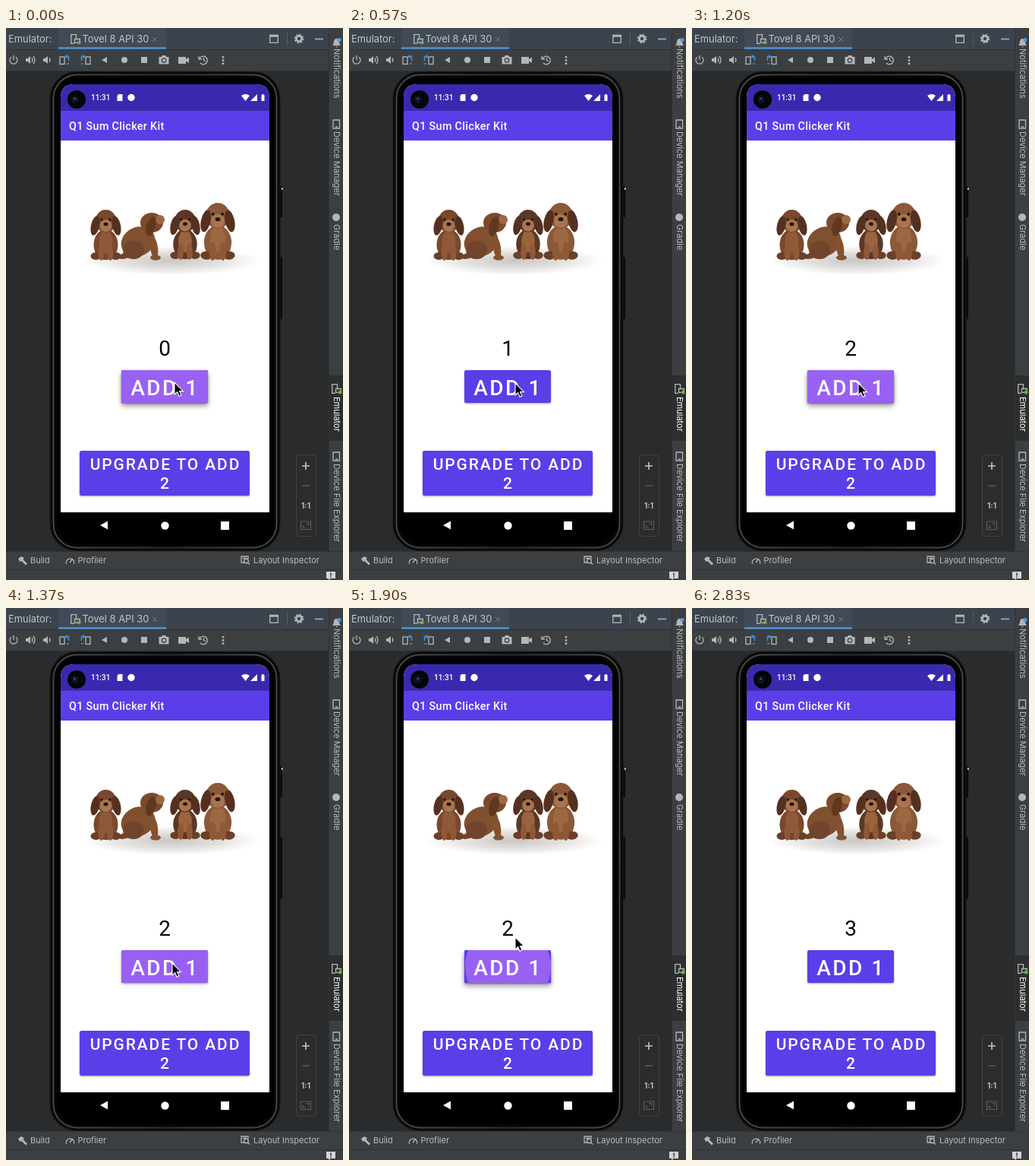
Recreate the animation shown at these times as an HTML page. Size 444 px wide and 726 px high, loop 2.91 s.

```html
<!DOCTYPE html>
<html lang="en">
<head>
<meta charset="utf-8">
<title>Counter in an emulator</title>
<style>
  html, body { margin: 0; width: 100%; height: 100%; overflow: hidden; background: #292b2d; }
  svg { display: block; width: 444px; height: 726px; }
  text { font-family: Inter, "Liberation Sans", sans-serif; white-space: pre; }
  .ide text { font-size: 11px; fill: #b9bcbe; }
  .ide .head { font-size: 12.9px; fill: #bfc4c9; }
  .app text { font-family: Roboto, "Noto Sans", sans-serif; font-weight: 500; fill: #fff; }
  .line { fill: none; stroke: #b4b7b9; stroke-width: 1.3; }
  .solid { fill: #b4b7b9; }
  .app .caps { text-anchor: middle; letter-spacing: .0893em; }
  .button { fill: #5c3ee9; filter: drop-shadow(0 1px 1.2px rgba(0, 0, 0, .38)); }
  #raised { fill: #000; filter: drop-shadow(0 4px 3.5px rgba(0, 0, 0, .4)); }
</style>
</head>
<body>
<svg viewBox="0 0 444 726">
  <defs>
    <clipPath id="screen"><path d="M72 672V92Q72 74 90 74H329Q347 74 347 92V672Z"/></clipPath>
    <clipPath id="addClip"><rect x="152" y="450" width="114" height="43" rx="2.5"/></clipPath>
    <radialGradient id="floor">
      <stop offset="0" stop-color="#c9c6c4"/>
      <stop offset=".55" stop-color="#e3e1df"/>
      <stop offset="1" stop-color="#fff"/>
    </radialGradient>
    <linearGradient id="rim" x2="1">
      <stop offset="0" stop-color="#4b4b4b"/>
      <stop offset=".5" stop-color="#2c2c2c"/>
      <stop offset="1" stop-color="#4b4b4b"/>
    </linearGradient>
    <g id="phoneIcon">
      <path class="line" d="M7.5 6V.7H.7V12.3H5"/>
      <path class="line" d="M5.5 6.5H12.3V11.3H5.5Z"/>
      <circle cx="11.2" cy="11.2" r="2.4" fill="#62b543"/>
    </g>
    <g id="speaker">
      <path class="solid" d="M-6 -2H-3.5L0 -5V5L-3.5 2H-6Z"/>
      <path class="line" d="M2 -2.6Q4 0 2 2.6"/>
    </g>
    <g id="turn">
      <rect class="line" x="-6" y="-4" width="6" height="9.5"/>
      <path d="M2 -4.5H5.5V1M3 5H6M3.5 -6.5L1.5 -4.5L3.5 -2.5" fill="none" stroke="#3d93d6" stroke-width="1.5"/>
    </g>
  </defs>

  <rect width="444" height="726" fill="#292b2d"/>

  <g class="ide">
    <rect width="426" height="56" fill="#3c3f41"/>
    <rect width="426" height="28" fill="#3b434d"/>
    <rect x="69" width="142" height="28" fill="#414a56"/>
    <rect x="69" y="25" width="142" height="3" fill="#4a88c7"/>
    <path d="M0 28.5H426M0 56.5H426" stroke="#303234"/>
    <text class="head" x="3" y="19">Emulator:</text>
    <use href="#phoneIcon" x="85" y="8"/>
    <text class="head" x="100.5" y="19">Tovel 8 API 30</text>
    <path d="M193 12L199 18M199 12L193 18" stroke="#777e85"/>
    <path class="line" d="M347.7 9.5H358.3V19.3H347.7ZM347.7 11H358.3M407 14.5H418"/>
    <path d="M370.5 5V23" stroke="#565b60"/>
    <circle cx="386" cy="14" r="3.6" fill="none" stroke="#b4b7b9" stroke-width="2.6"/>
    <circle cx="386" cy="14" r="5.4" fill="none" stroke="#b4b7b9" stroke-width="1.8" stroke-dasharray="2.2 2.04"/>

    <path class="line" d="M7 38.2A5 5 0 1 0 13 38.2M10 36V42"/>
    <use href="#speaker" x="32" y="42"/>
    <path class="line" d="M36 37Q40 42 36 47"/>
    <use href="#speaker" x="55" y="42"/>
    <use href="#turn" x="77" y="42"/>
    <use href="#turn" transform="translate(105 42) scale(-1 1)"/>
    <path class="solid" d="M126 42L133 38V46ZM178 38H186V46H178Z"/>
    <circle class="solid" cx="156" cy="42" r="4"/>
    <path class="solid" d="M201.500 38H204.500L206 36H210L211.500 38H214.500V47.500H201.500Z"/>
    <circle cx="208" cy="42.500" r="2.700" fill="#b4b7b9" stroke="#3c3f41" stroke-width="1.300"/>
    <path class="solid" d="M227 38H237V41L241 38.500V46L237 43.500V47H227Z"/>
    <path class="line" d="M255.300 40A5.300 5.300 0 1 1 256 46M254 37V41H258M260.500 39V42.500L263 44"/>
    <path d="M286 37V48" stroke="#b4b7b9" stroke-width="2.600" stroke-dasharray="2.600 1.600"/>

    <rect x="426" width="18" height="712" fill="#3c3f41"/>
    <rect x="426" y="457" width="18" height="86" fill="#2c2e2f"/>
    <path d="M425.500 0V688" stroke="#303234"/>
    <path class="solid" d="M430 23Q432 21 432 17.500Q432.500 14 435.500 14Q439 14 439 17.500Q439 21 441 23ZM434 24H437L435.500 25.500Z"/>
    <circle cx="439" cy="15.500" r="2.600" fill="#4a9bd8"/>
    <path class="line" d="M431 121H439.500V132H431ZM434 130H437"/>
    <circle class="solid" cx="435" cy="249" r="5"/>
    <use href="#phoneIcon" x="429" y="468"/>
    <path class="line" d="M431 558H439.500V569H431ZM434 567H437"/>
    <g id="side"></g>

    <rect y="688" width="444" height="38" fill="#3c3f41"/>
    <path d="M0 688.500H444M0 712.500H444" stroke="#303234"/>
    <path class="solid" d="M16 698L20 695L24 697L22.500 699L28 704.500L26 706.500L20.500 701L18.500 702Z"/>
    <text x="32" y="704">Build</text>
    <path class="line" d="M79.500 705A5.300 5.300 0 1 1 89.500 705M84 703L88 698"/>
    <text x="94.500" y="704">Profiler</text>
    <path class="line" d="M315 703H310V695H319V698M312 697.500H317"/>
    <circle class="line" cx="316.500" cy="701" r="2.800"/>
    <path class="line" d="M318.500 703L321 705.500"/>
    <text x="326" y="704">Layout Inspector</text>
    <path d="M422 715H434V724H428L425 726V724H422Z" fill="#d3d5d6"/>
    <path d="M428 716.500V720.500M428 721.500V723" stroke="#3c3f41" stroke-width="1.600"/>

    <rect x="382.500" y="561.500" width="26" height="107" rx="4" fill="#2a2c2e" stroke="#404244"/>
    <path d="M390 576H400M395 571V581" stroke="#c4c6c8" stroke-width="1.600"/>
    <path d="M390 602H400" stroke="#5b5e60" stroke-width="1.400"/>
    <text x="395" y="632" text-anchor="middle" style="font-size:10px;font-weight:700">1:1</text>
    <path d="M388.500 649H401.500V659.500H388.500ZM391.500 654V657H394.500M398.500 654.500V651.500H395.500" fill="none" stroke="#5b5e60" stroke-width="1.200"/>
  </g>

  <rect x="360" y="208" width="4" height="41" rx="1" fill="#0b0b0b"/>
  <rect x="360" y="301" width="4" height="82" rx="1" fill="#0b0b0b"/>
  <rect x="363" y="210" width="1.500" height="3" fill="#ddd"/>
  <rect x="58" y="57.500" width="303" height="630" rx="35" fill="#090909" stroke="#191919"/>
  <rect x="62.500" y="61.500" width="294" height="622" rx="31" fill="#050505" stroke="url(#rim)" stroke-width="1.800"/>
  <rect x="67" y="66" width="285" height="613" rx="27" fill="#000"/>

  <g class="app" clip-path="url(#screen)">
    <rect x="72" y="74" width="275" height="563" fill="#fff"/>
    <rect x="72" y="109" width="275" height="39" fill="#5c3ee9"/>
    <rect x="72" y="74" width="275" height="35" fill="#3929af"/>
    <circle cx="93" cy="94" r="12" fill="#050507"/>
    <circle cx="91" cy="94" r="5" fill="#10131f"/>
    <circle cx="90.500" cy="93" r="1.300" fill="#495b8a"/>
    <text x="112" y="95" font-size="10">11:31</text>
    <path d="M148.500 87H153.500V96H146.500V89Z" fill="#fff"/>
    <circle cx="165" cy="91.500" r="4.700" fill="#fff"/>
    <path d="M310 89Q315.500 85 321 89L315.500 96ZM331 87V96H322ZM336.500 88H337.500V87H339.500V88H340.500V96H336.500Z" fill="#fff"/>
    <text x="83" y="134" font-size="14.300" letter-spacing=".35">Q1 Sum Clicker Kit</text>

    <ellipse cx="218" cy="306" rx="117" ry="19" fill="url(#floor)"/>
    <g id="dogs"></g>

    <text id="count" x="209" y="431" font-size="28" text-anchor="middle" style="fill:#000;font-weight:400">0</text>
    <rect id="raised" x="152" y="450" width="114" height="43" rx="2.500"/>
    <rect class="button" x="152" y="450" width="114" height="43" rx="2.500"/>
    <g clip-path="url(#addClip)"><circle id="ripple" fill="#9961f3"/></g>
    <text class="caps" x="209.500" y="483" font-size="28">ADD 1</text>
    <rect class="button" x="97" y="556" width="224" height="59" rx="2.500"/>
    <text class="caps" x="210" y="581" font-size="21">UPGRADE TO ADD</text>
    <text class="caps" x="210" y="606" font-size="21">2</text>

    <path d="M124 654L134 648.500V659.500ZM283 649H294V660H283Z" fill="#fff"/>
    <circle cx="209.500" cy="654.500" r="5.200" fill="#fff"/>
  </g>

  <g id="ring" fill="none">
    <circle cx="220" cy="471" r="20" stroke="#fff" stroke-width="6"/>
    <circle cx="220" cy="471" r="20.500" stroke="#000" stroke-width="3.300"/>
  </g>
  <path id="cursor" d="M0 0V16L3.700 12.600L6.100 18.200L8.900 17L6.500 11.600H11.500Z" fill="#000" stroke="#fff" stroke-width="1.100"/>
</svg>

<script>
const LOOP = 2910;
const $ = id => document.getElementById(id);

// Sidebar labels: text, top, colour
$('side').innerHTML = [
  ['Notifications', 27], ['Device Manager', 136], ['Gradle', 258],
  ['Emulator', 485, '#fff'], ['Device File Explorer', 573]
].map(([name, y, color = '#b9bcbe']) =>
  `<text transform="translate(431.5 ${y}) rotate(90)" style="fill:${color}">${name}</text>`).join('');

const oval = (x, y, rx, ry, fill, turn = 0) =>
  `<ellipse cx="${x}" cy="${y}" rx="${rx}" ry="${ry}" fill="${fill}" transform="rotate(${turn} ${x} ${y})"/>`;

function sittingDog(x, top, height, coat, chest) {
  const s = height / 68;
  const parts = [
    oval(0, 46, 16, 20, coat), oval(0, 42, 9, 15, chest),
    oval(-13, 61, 7, 5, '#6b3f28'), oval(13, 61, 7, 5, '#6b3f28'),
    oval(-6, 56, 4, 11, '#8f5937'), oval(6, 56, 4, 11, '#8f5937'),
    oval(0, 15, 14, 15, coat),
    oval(-14, 21, 5.5, 13, '#56301f', 12), oval(14, 21, 5.5, 13, '#56301f', -12),
    oval(0, 21, 8, 8, '#a9744e'),
    oval(-5.5, 13, 1.7, 1.7, '#1d1410'), oval(5.5, 13, 1.7, 1.7, '#1d1410'),
    oval(0, 19, 3, 2.3, '#1d1410')
  ];
  return `<g transform="translate(${x} ${top}) scale(${s})">${parts.join('')}</g>`;
}

$('dogs').innerHTML = [
  oval(158, 299, 10, 4, '#70452e', -18), oval(174, 281, 23, 19, '#80502f', -25),
  oval(168, 292, 14, 12, '#70442d'), oval(195, 289, 5, 15, '#83522f', -8),
  oval(197, 302, 7, 3.5, '#83522f'), oval(192, 256, 15, 13, '#7a492e'),
  oval(203, 252, 6, 6, '#a0683f'), oval(191, 261, 6, 13, '#60371f', 15),
  sittingDog(131.5, 239, 68, '#79482d', '#8f5a3a'),
  sittingDog(236, 239, 67, '#5b3826', '#9a643f'),
  sittingDog(279, 230, 77, '#8b5937', '#9c6842')
].join('');

// Piecewise linear value from [time, value] steps
function at(steps, t) {
  let i = steps.findIndex(s => s[0] > t);
  if (i < 0) return steps[steps.length - 1][1];
  if (i === 0) return steps[0][1];
  const [t0, a] = steps[i - 1], [t1, b] = steps[i];
  return a + (b - a) * (t - t0) / (t1 - t0);
}

// Ripple start of each press; the first began before the loop
const presses = [-270, 960, 1715];
const radius = [[0, 18], [185, 56.5], [230, 63]];
const fade = [[0, .75], [60, 1], [400, 1], [640, 0]];
const lift = [[0, 0], [80, 1], [310, 1], [430, 0]];
const additions = [50, 1165, 2000];
const rings = [[900, 1000], [1640, 1740]];
const cursorX = [[0, 222], [240, 222], [400, 219]];
const cursorY = [[0, 466], [400, 467], [1770, 467], [1900, 433], [2000, 330], [2170, -30]];

function draw(now) {
  const step = Math.floor((now % LOOP + 4) * .03);
  const t = step / .03;
  const since = t - presses.filter(p => p <= t).pop();
  const r = at(radius, since);
  const settle = Math.min(1, since / 185);

  $('count').textContent = additions.filter(a => a <= t).length;
  $('ripple').setAttribute('cx', 220 - 10.5 * settle);
  $('ripple').setAttribute('cy', 471.5);
  $('ripple').setAttribute('r', r);
  $('ripple').style.opacity = at(fade, since);
  $('raised').style.opacity = at(lift, since);
  $('ring').style.display = rings.some(([a, b]) => t >= a && t < b) ? '' : 'none';
  $('cursor').setAttribute('transform', `translate(${at(cursorX, t)} ${at(cursorY, t)})`);
}

const start = performance.now();
function tick() {
  draw(performance.now() - start);
  requestAnimationFrame(tick);
}
tick();
</script>
</body>
</html>
```
